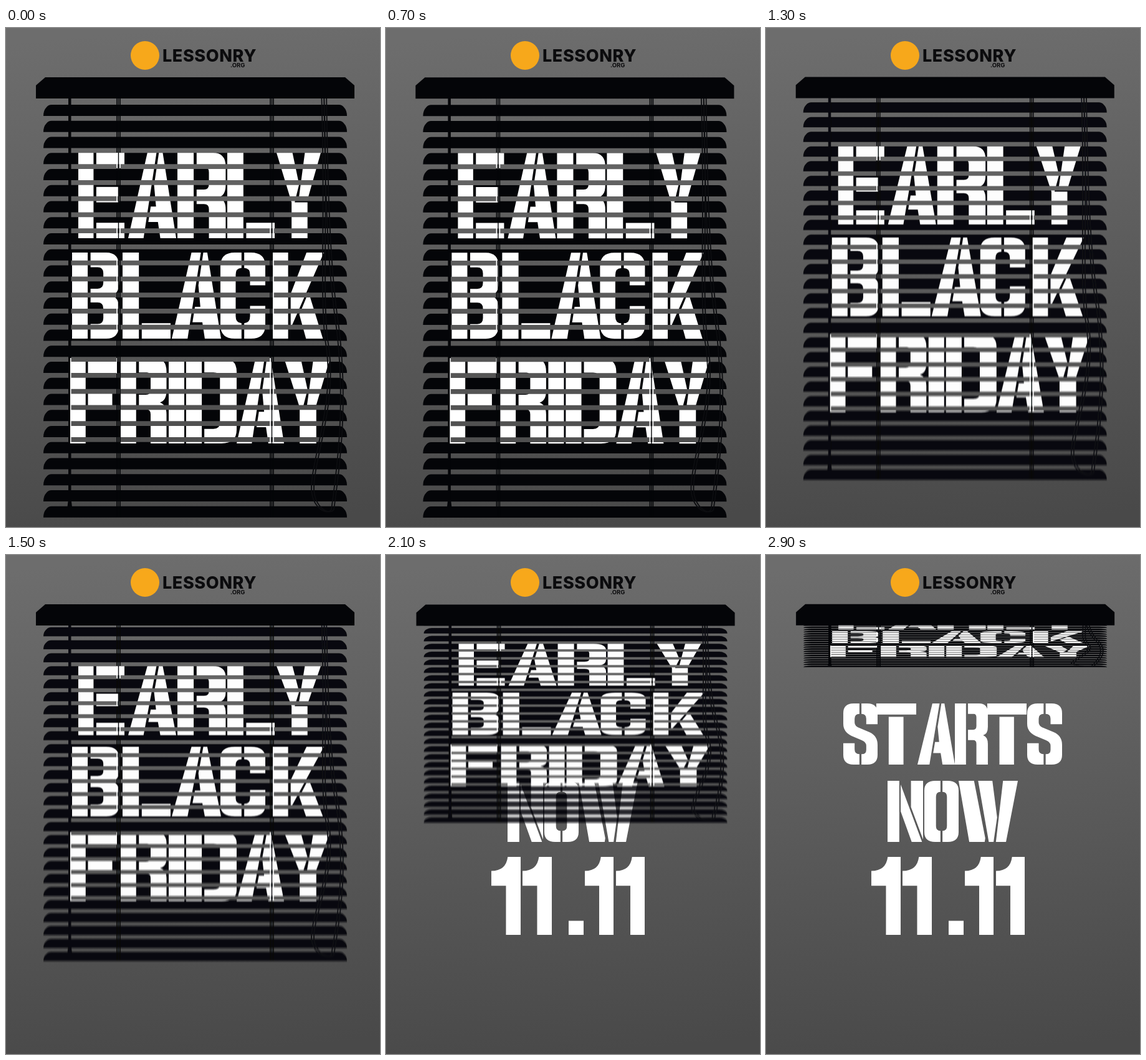
Recreate the animation shown at these times as an HTML page with a canvas. Size 600 px wide and 800 px high, loop 3 s.

```html
<!DOCTYPE html>
<html lang="en">
<head>
<meta charset="utf-8">
<title>Early Black Friday</title>
<style>
html, body { margin: 0; width: 100%; height: 100%; overflow: hidden; background: #5c5c5c; }
canvas { display: block; width: 600px; height: 800px; }
</style>
</head>
<body>
<canvas id="stage" width="600" height="800" role="img" aria-label="Early Black Friday starts now 11.11"></canvas>
<script>
const W = 600, H = 800, LOOP = 3000, STEP = 100;
const INK = '#040508';
const PIVOT = 85.5, OPEN = 784, CLOSED = 180;
const SAMPLES = 7, SHUTTER = 14;

// Stencil glyphs on a 100 x 100 box
const GLYPHS = {
  A: 'M0 100L40 0H59L32 100ZM64 0H72L100 100H67L62 81H42L47 63H58L54 38Z',
  B: 'M0 0H33V100H0ZM39 0H72Q99 0 99 16V36Q99 47 84 50Q99 53 99 64V84Q99 100 72 100H39V83H54Q66 83 66 76V65Q66 58 54 58H39V42H54Q66 42 66 35V24Q66 17 54 17H39Z',
  C: 'M47 0V18Q34 18 34 26V74Q34 82 47 82V100H32Q0 100 0 84V16Q0 0 32 0ZM53 0H68Q100 0 100 16V38H66V26Q66 18 53 18ZM53 100H68Q100 100 100 84V62H66V74Q66 82 53 82Z',
  D: 'M0 0H31V100H0ZM36 0H70Q100 0 100 16V84Q100 100 70 100H36V83H54Q67 83 67 76V24Q67 17 54 17H36Z',
  E: 'M0 0H33V100H0ZM39 0H100V18H39ZM39 40H88V58H39ZM39 82H100V100H39Z',
  F: 'M0 0H33V100H0ZM38 0H100V18H38ZM38 40H90V59H38Z',
  I: 'M0 0H100V100H0Z',
  K: 'M0 0H30V100H0ZM35 48L66 0H100L35 88ZM70 46L98 100H65L52 72Z',
  L: 'M0 0H34V100H0ZM40 82H100V100H40Z',
  N: 'M0 0H33V100H0ZM37 6L97 100H68L37 50ZM66 0H100V96L66 43Z',
  O: 'M47 0V18Q34 18 34 26V74Q34 82 47 82V100H32Q0 100 0 84V16Q0 0 32 0ZM53 0H68Q100 0 100 16V84Q100 100 68 100H53V82Q66 82 66 74V26Q66 18 53 18Z',
  R: 'M0 0H33V100H0ZM39 0H72Q98 0 98 16V38Q98 50 84 52Q98 55 98 66V100H64V66Q64 60 54 60H39V43H54Q64 43 64 37V23Q64 17 56 17H39Z',
  S: 'M47 0V17Q33 17 33 25V31Q33 37 47 40L76 47Q100 53 100 68V84Q100 100 70 100H53V83Q67 83 67 76V69Q67 63 53 60L24 53Q0 47 0 33V16Q0 0 30 0ZM53 0H70Q100 0 100 16V34H67V25Q67 17 53 17ZM47 100H30Q0 100 0 84V65H33V75Q33 83 47 83Z',
  T: 'M0 0H100V18H0ZM31 22H68V100H31Z',
  W: 'M0 0H26L45 94L44 100H18ZM33 0H57L65 60L59 100H51ZM75 0H100L80 100H63Z',
  Y: 'M0 0H36L51 37L41 58H70V100H34V58ZM64 0H100L70 55H50Z',
  1: 'M0 18Q50 18 56 0H100V100H50V37H0Z',
  '.': 'M0 82H100V100H0Z'
};

// Builds one path from a word, its top and height, and left/right pairs
function word(text, top, height, edges) {
  const path = new Path2D();
  [...text].forEach((ch, i) => {
    const [x0, x1] = edges[i];
    path.addPath(new Path2D(GLYPHS[ch]),
      new DOMMatrix([(x1 - x0) / 100, 0, 0, height / 100, x0, top]));
  });
  return path;
}

function join(...paths) {
  const all = new Path2D();
  paths.forEach(p => all.addPath(p));
  return all;
}

const printed = join(
  word('EARLY', 200, 137, [[116, 190], [196, 273], [275, 354], [355, 431], [434, 505]]),
  word('BLACK', 360, 138, [[106, 182], [187, 264], [266, 345], [344, 416], [428, 510]]),
  word('FRIDAY', 529, 137, [[103, 178], [184, 259], [261, 286], [289, 370], [370, 446], [446, 520]])
);

const offer = join(
  word('STARTS', 238, 98, [[124, 179], [177, 241], [243, 303], [303, 357], [355, 418], [419, 475]]),
  word('NOW', 362, 98, [[195, 252], [254, 309], [309, 404]]),
  word('11.11', 484, 125, [[169, 216], [219, 266], [293, 317], [319, 365], [369, 415]])
);

const slats = new Path2D();
for (let i = 0; i < 26; i++) {
  const y = 123 + i * 25.75;
  slats.addPath(new Path2D(
    `M60 ${y + 18}Q60 ${y + 9} 65 ${y + 4}Q68 ${y} 73 ${y}H534Q539 ${y} 542 ${y + 4}Q547 ${y + 9} 547 ${y + 18}Z`));
}

const rod = new Path2D('M100 100H104.5V755L106 768H98.5L100 755Z');
const ladders = new Path2D('M178 100V784M183 100V784M424 100V784M429 100V784');
const overLadders = new Path2D('M180.5 100V784M426.5 100V784');
const loop = new Path2D('M506 100C513 300 503 420 512 500C530 600 489 690 490 740C492 770 515 782 522 772C532 700 545 600 530 480C515 380 512 250 510 100');
const pull = new Path2D(loop);
pull.addPath(loop, new DOMMatrix([1, 0, 0, 1, 4, 0]));
const rail = new Path2D('M48 113V92L63 79H544L559 92V113Z');

const ctx = document.getElementById('stage').getContext('2d');

function layer() {
  const c = document.createElement('canvas');
  c.width = W;
  c.height = H;
  return c.getContext('2d');
}
const pose = layer(), blur = layer();

function wipe(c) {
  c.setTransform(1, 0, 0, 1, 0, 0);
  c.clearRect(0, 0, W, H);
}

function stroke(c, path, color, width) {
  c.strokeStyle = color;
  c.lineWidth = width;
  c.stroke(path);
}

function drawPose(bottom, dx, dy) {
  const s = (bottom - PIVOT) / (OPEN - PIVOT);
  wipe(pose);
  pose.setTransform(1, 0, 0, s, dx, PIVOT * (1 - s) + dy);
  pose.fillStyle = INK;
  pose.fill(slats);
  pose.fill(rod);
  stroke(pose, ladders, INK, 1.6);
  pose.globalCompositeOperation = 'source-atop';
  pose.fillStyle = '#fff';
  pose.fill(printed);
  pose.globalCompositeOperation = 'source-over';
  stroke(pose, overLadders, INK, 1.4);
  stroke(pose, pull, '#0c0d10', 1.8);
}

const bottomAt = t => Math.min(OPEN, Math.max(CLOSED, 724.3 - 0.37 * (t - 1300)));

// Averages several poses around t for motion blur
function drawBlind(t, dx, dy) {
  const moving = bottomAt(t - 10) !== bottomAt(t + 10);
  const n = moving ? SAMPLES : 1;
  wipe(blur);
  blur.globalCompositeOperation = 'lighter';
  blur.globalAlpha = 1 / n;
  for (let i = 0; i < n; i++) {
    drawPose(bottomAt(t + SHUTTER * ((i + 0.5) / n - 0.5)), dx, dy);
    blur.drawImage(pose.canvas, 0, 0);
  }
  ctx.drawImage(blur.canvas, 0, 0);
}

function drawOffer(t, alpha) {
  const top = 538 - 0.44 * (t - 1700);
  if (top > 609) return;
  ctx.save();
  ctx.beginPath();
  ctx.rect(0, top, W, H - top);
  ctx.clip();
  ctx.globalAlpha = alpha;
  ctx.fillStyle = '#fff';
  ctx.fill(offer);
  ctx.restore();
}

function label(text, x, y, font, spacing) {
  ctx.font = font;
  ctx.letterSpacing = spacing;
  ctx.fillText(text, x, y);
}

function drawBrand() {
  ctx.fillStyle = '#f7a81b';
  ctx.beginPath();
  ctx.arc(223, 44, 23, 0, 7);
  ctx.fill();
  ctx.fillStyle = '#0b0b0d';
  label('LESSONRY', 251, 54, '800 27px Inter, sans-serif', '0.6px');
  label('.ORG', 360, 63, '700 9.5px Inter, sans-serif', '0px');
}

const shade = ctx.createLinearGradient(260, 0, 340, 800);
shade.addColorStop(0, '#6d6d6d');
shade.addColorStop(1, '#494949');

function draw(t) {
  const turn = 2 * Math.PI * t / LOOP;
  const dx = -0.6 * Math.sin(turn), dy = 0.8 * Math.sin(2 * turn);
  ctx.fillStyle = shade;
  ctx.fillRect(0, 0, W, H);
  drawBrand();
  drawOffer(t, 1);
  drawBlind(t, dx, dy);
  drawOffer(t, 0.12);
  ctx.save();
  ctx.translate(dx, dy);
  ctx.fillStyle = INK;
  ctx.fill(rail);
  ctx.restore();
}

const start = performance.now();
let last = -1;
function tick() {
  const t = Math.floor((performance.now() - start) % LOOP / STEP) * STEP;
  if (t !== last) draw(last = t);
  requestAnimationFrame(tick);
}
tick();
</script>
</body>
</html>
```
